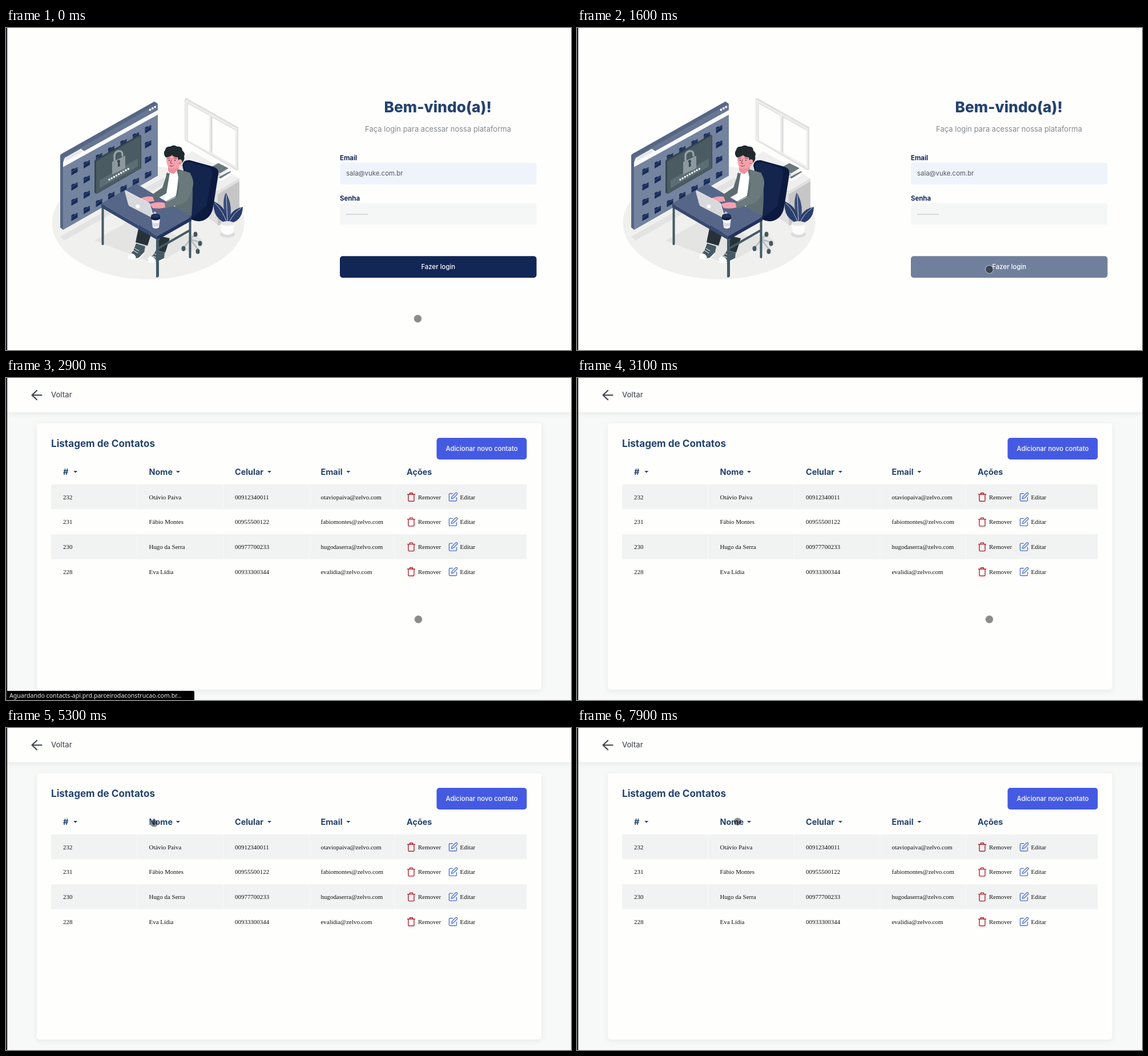
Recreate the animation shown at these times as an HTML page. Size 990 by 565 pixels, loop 8 s.

```html
<!DOCTYPE html>
<html lang="pt-BR">
<head>
<meta charset="utf-8">
<title>Contatos</title>
<style>
  html, body { margin: 0; height: 100%; overflow: hidden; background: #fefefd; }
  svg { display: block; width: 100vw; height: 100vh; }
  text { font: 500 11.4px Inter, sans-serif; }
  .mid { text-anchor: middle; }
  .label { font-weight: 700; fill: #11265a; }
  .title, .head text { font-weight: 700; fill: #24436f; }
  .head text { font-size: 14.4px; }
  #rows text { font: 10.95px "Liberation Serif", serif; fill: #111; }
  .line { fill: none; stroke-linecap: round; stroke-linejoin: round; }
</style>
</head>
<body>
<svg viewBox="0 0 990 565">
<defs>
  <filter id="soft" x="-5%" y="-10%" width="110%" height="125%">
    <feDropShadow dx="0" dy="2" stdDeviation="5" flood-opacity=".07"/>
  </filter>
  <g id="folder">
    <path d="M-5.500-2.500l4-2.500 1.200 1.200 5.800-3.300v8.500l-11 6.300z"/>
    <path d="M-5.500 3.500l1.500-3 10-5.700" fill="none" stroke="#53648a" stroke-width=".7"/>
  </g>
  <g id="trash" class="line" stroke="#b4202f" stroke-width="1.400">
    <path d="M-6.500-4.500h13M-5-4.500v10.500q0 1.500 1.500 1.500h7q1.500 0 1.500-1.500v-10.500M-2.500-4.500v-2.500h5v2.500"/>
  </g>
  <g id="edit" class="line" stroke="#4f74d4" stroke-width="1.400">
    <path d="M-1-6h-4.500q-1.500 0-1.500 1.500v10q0 1.500 1.500 1.500h10q1.500 0 1.500-1.500v-4.500M-3 3l.8-3.400 6.700-6.700q1.200-.8 2.300.3t.2 2.300l-6.700 6.700z"/>
  </g>
</defs>

<g id="login">
  <rect width="990" height="565" fill="#fefefd"/>
  <ellipse cx="249" cy="342" rx="168.500" ry="99" fill="#f0f0ef"/>

  <!-- window -->
  <path d="M313 124l3-1 91 51v75l-3 1-91-53z" fill="#dedede"/>
  <path d="M314 125l91 51v72l-91-52z" fill="#ededed"/>
  <path d="M318 132l38 21v64l-38-21zM361 156l41 23v63l-41-23z" fill="#fefefd"/>
  <path class="line" d="M318 196v-64l38 21M361 219v-63l41 23M359.500 155v62" stroke="#d2d2d2"/>

  <!-- cabinet, books, plant -->
  <path d="M302 234l24-18 83 48-38 23z" fill="#efefef"/>
  <path d="M302 234l69 53v58l-69-48z" fill="#dedede"/>
  <path d="M371 287l38-23v66l-38 17z" fill="#c6c6c6"/>
  <path d="M371 287l38-23v5l-38 23z" fill="#dfdfdf"/>
  <path d="M362 254l14 8 17-9v6l-17 10-14-8z" fill="#fff"/>
  <path d="M356 246l16-9 18 9-15 9zM372 262l21-11 1 2-18 11z" fill="#6a787e"/>
  <path d="M356 247l19 9v4l-19-9z" fill="#b9bfc1"/>
  <ellipse cx="388" cy="362" rx="13" ry="6" fill="#dcdcdc"/>
  <path d="M388 343q-12-34-3-54 14 22 6 54z" fill="#3a4d78"/>
  <path d="M387 343q-26-9-23-39 24 11 25 39zM390 343q0-24 25-29-1 26-25 29z" fill="#2a3d6c"/>
  <path class="line" d="M388 342l-2-48M387 342q-6-20-21-35M391 341q6-15 21-25" stroke="#c4ccdc" stroke-width="1"/>
  <path d="M376 343h24l-2 16q-10 8-20 0z" fill="#fcfcfc"/>
  <ellipse cx="388" cy="343" rx="12" ry="4" fill="#e8e8e8"/>

  <!-- screen with folders -->
  <path d="M95 366l180-103 12 5-185 105z" fill="#e3e3e3"/>
  <path d="M95 224q0-2 2-3l163-92 6 4v126l-166 95-5-4z" fill="#566684"/>
  <path d="M100 228l166-95v126l-166 95z" fill="#74839e"/>
  <path d="M100 228l166-95v14l-166 95z" fill="#677793"/>
  <path d="M100 236l3-8 28-16 6 4 129-72v8l-166 92z" fill="#fbfbfb"/>
  <path d="M105 228l25-14 4 3-30 17z" fill="#e3e6ec"/>
  <path class="line" d="M252.500 143.500l10-5.700" stroke="#fff" stroke-width="3.800" stroke-dasharray="0 5"/>
  <g id="folders" fill="#182c58"></g>
  <path d="M155 233l3-3 76-43 3 2v57l-78 45-4-2z" fill="#37474f"/>
  <path d="M158 234l78-45v57l-78 45z" fill="#4a5b62"/>
  <path d="M164 267l67-38v14l-67 38z" fill="#5d6d74"/>
  <path class="line" d="M190 232v-8q1-7 7-8 7-1 7 6v2" stroke="#98a3a8" stroke-width="3.400"/>
  <path d="M186 235l23-11v22l-23 11z" fill="#8d999e"/>
  <path d="M196 236a2.500 2.500 0 1 1 3 0l1 6-4 2z" fill="#35454c"/>
  <path class="line" d="M181 266l33.500-19" stroke="#fff" stroke-width="3.500" stroke-dasharray="0 4.780"/>

  <!-- chair -->
  <path d="M155 373l78-44 92 50-62 35z" fill="#e4e4e3"/>
  <ellipse cx="322" cy="377" rx="23" ry="14" fill="#e4e4e3"/>
  <path class="line" d="M323 338v33l-11 14M323 371l13 17M323 371l17 5M323 371l10-11" stroke="#b5bdc0" stroke-width="2.500"/>
  <g fill="#455860"><ellipse cx="311" cy="387" rx="3.500" ry="4.500"/><ellipse cx="336" cy="392" rx="3.500" ry="4.500"/><ellipse cx="340" cy="378" rx="3.500" ry="4.500"/><ellipse cx="332" cy="362" rx="3.500" ry="4.500"/></g>
  <path d="M309 241q1-10 13-9l40 11q12 3 10 14l-9 57q-3 18-18 24-10 3-20-2l-20-14 19-15z" fill="#0c1a3f"/>
  <path d="M311 239q4-5 14-3l30 9q8 3 6 13l-10 55-27 21-19-15 20-20z" fill="#13244d"/>

  <!-- person -->
  <path d="M234 342l22 14-8 26-21-6zM270 365l17 4-8 25-16-4z" fill="#263238"/>
  <path d="M228 378l16 5-2 11-9 10q-15 4-20-2l10-11zM263 390l15 4-1 10-10 7q-15 3-20-4l11-9z" fill="#455a64"/>
  <path d="M213 401l6-6q7 1 9 8l-3 2q-8 1-12-4zM247 406l6-6q8 1 10 9l-4 2q-8 1-12-5z" fill="#fff"/>
  <path class="line" d="M214 403q8 4 19 1l9-9M248 409q9 4 19 1l10-5" stroke="#fff" stroke-width="2"/>
  <path class="line" d="M223 390l8 5M226 387l7 4M257 400l8 4M260 396l7 4" stroke="#fff"/>
  <path d="M281 255l14-9 28 8q7 20 2 76l-48-16z" fill="#5f6e72"/>
  <path d="M284 252l15-4 3 14-6 53-20-7z" fill="#fff"/>
  <path d="M284 240h18l1 7-9 9q-8-1-10-6z" fill="#f08f9c"/>
  <path d="M281 223q12-5 25 0l2 10q0 7-8 12-9 4-15 0-5-8-4-22z" fill="#f7a1ad"/>
  <path d="M280 227q-6-7-1-13 1-7 9-6 6-4 12 0 9-1 9 7 6 5 3 10 2 6-4 12l-5 1-2-11q-7 0-10-4-5 4-11 4z" fill="#20292e"/>
  <circle cx="305" cy="234" r="3.500" fill="#f7a1ad"/>
  <path class="line" d="M283 229l4-1M294 228l5 1M290 231l-2 6 3 1M287 242q4 2 7-1" stroke="#743b48"/>
  <circle cx="286" cy="232" r="1" fill="#263238"/><circle cx="296" cy="232" r="1" fill="#263238"/>

  <!-- desk -->
  <path class="line" d="M169.500 314v65M322.500 334v68M268 386l54-31" stroke="#455a64" stroke-width="4"/>
  <path d="M167 308l61-35 97 58-60 34z" fill="#566689"/>
  <path d="M167 308l98 57v7l-98-57z" fill="#384970"/>
  <path d="M265 365l60-34v7l-60 34z" fill="#22335d"/>
  <path d="M263 371l5-2v67l-3 2-2-1z" fill="#455a64"/>

  <!-- arms, laptop, cup -->
  <path d="M282 256l-8 24-22 15 5 9 24-14 6-36z" fill="#5c6b6f"/>
  <path d="M303 250q23 0 25 19 1 15-9 31-6 8-17 10l-24 7-2-9 21-11 4-18z" fill="#6a797c"/>
  <path class="line" d="M304 272l-4 22-22 12" stroke="#4c5c60"/>
  <path d="M257 296q-12-2-24 4l6 6 21-2zM278 307q-12-4-26 2l5 7q13 2 22-1z" fill="#f7a1ad"/>
  <path d="M253 331l7-9 3 1 1 7-5 5z" fill="#c1c4c7"/>
  <path d="M208 287q0-2 3-1l39 21q2 1 3 4l7 24-43-22q-2-1-3-4z" fill="#d8d9dc"/>
  <path class="line" d="M209 285l42 22 8 27" stroke="#f3f3f4"/>
  <circle cx="231" cy="313" r="3.500" fill="#fff"/>
  <path d="M255 332h15l-2 18q-6 4-11 0z" fill="#f7f7fa"/>
  <path d="M254 331q0-5 8-5t8 5v4q-8 5-16 0z" fill="#0f1e45"/>
  <ellipse cx="262" cy="330" rx="7" ry="3" fill="#21345f"/>
  <path d="M256 341q6 3 13 0l-1 6q-6 3-11 0z" fill="#d7dae5"/>

  <!-- form -->
  <text class="title mid" x="756.800" y="148" style="font-size:26.300px;font-weight:800">Bem-vindo(a)!</text>
  <text class="mid" x="757" y="182.200" style="font-size:13px;font-weight:400" fill="#85888d">Faça login para acessar nossa plataforma</text>
  <text class="label" x="585" y="232">Email</text>
  <rect x="585" y="236.500" width="344.600" height="38" rx="4.500" fill="#eff4fc"/>
  <text x="596" y="259" fill="#53575e" style="font-weight:400">sala@vuke.com.br</text>
  <text class="label" x="585" y="303">Senha</text>
  <rect x="585" y="307.300" width="344.600" height="38" rx="4.500" fill="#f5f7f7"/>
  <path class="line" d="M597.500 327h35.500" stroke="#7d8186" stroke-width="1.600" stroke-dasharray="0 3.500"/>
  <rect id="submit" x="585" y="400.200" width="344.600" height="38" rx="5"/>
  <text class="mid" x="757.300" y="423.200" fill="#fff">Fazer login</text>
</g>

<g id="list">
  <rect width="990" height="565" fill="#f7f9f9"/>
  <rect width="990" height="60" fill="#fefefd" filter="url(#soft)"/>
  <path id="back" class="line" d="M62.500 30h-16M54 22l-8.500 8 8.500 8" stroke="#40454b" stroke-width="2.200"/>
  <text x="79" y="34" fill="#50545a" style="font-size:13px">Voltar</text>
  <rect x="54" y="79.500" width="884" height="467" rx="5" fill="#fefefd" filter="url(#soft)"/>
  <text class="title" x="79" y="120.500" style="font-size:17.100px">Listagem de Contatos</text>
  <rect x="754.500" y="105" width="158" height="38" rx="5" fill="#455ae2"/>
  <text class="mid" x="833.500" y="128" fill="#fff">Adicionar novo contato</text>
  <g id="empty" class="head mid"></g>
  <g id="table">
    <g id="head" class="head"></g>
    <g id="carets" fill="#24436f"></g>
    <g id="rows"></g>
  </g>
  <g id="status">
    <path d="M2 549h326q2 0 2 2v14h-328z"/>
    <text x="6" y="561" fill="#eee" style="font:10.600px 'Noto Sans',sans-serif">Aguardando contacts-api.prd.parceirodaconstrucao.com.br…</text>
  </g>
</g>

<rect width="2.200" height="565" fill="#232226"/>
<circle id="pointer" r="7" fill-opacity=".45" stroke="#fff" stroke-opacity=".5" stroke-width="1.200"/>
</svg>

<script>
const $ = id => document.getElementById(id);
const show = (id, on) => $(id).style.display = on ? '' : 'none';

const columns = ['#', 'Nome', 'Celular', 'Email', 'Ações'];
const left = [100, 250.5, 401, 551.5, 702];
const centers = [106, 245, 429, 620, 797];
const caretX = [121.7, 301.5, 461.5, 599.8];
const contacts = [
  [232, 'Otávio Paiva', '00912340011', 'otaviopaiva@zelvo.com'],
  [231, 'Fábio Montes', '00955500122', 'fabiomontes@zelvo.com'],
  [230, 'Hugo da Serra', '00977700233', 'hugodaserra@zelvo.com'],
  [228, 'Eva Lídia', '00933300344', 'evalidia@zelvo.com']
];
const byName = [...contacts].sort((a, b) => a[1].localeCompare(b[1]));

const text = (x, y, s) => `<text x="${x}" y="${y}">${s}</text>`;
const heads = xs => columns.map((s, i) => text(xs[i], 170, s)).join('');
$('empty').innerHTML = heads(centers);
$('head').innerHTML = heads(left);

let folders = '';
for (let c = 0; c < 7; c++)
  for (let r = 0; r < 4; r++)
    folders += `<use href="#folder" x="${120 + c * 21.5}" y="${251 - c * 12.3 + r * 26.7}"/>`;
$('folders').innerHTML = folders;

function row(contact, i) {
  const y = 208.7 + i * 43.7, top = y - 21.8, base = y + 3.8;
  const gaps = left.slice(1).map(x => `M${x - 20.5} ${top}v43.5`).join('');
  const band = i % 2 ? '' : `<rect x="79" y="${top}" width="833.5" height="43.5" fill="#f1f2f2"/>` +
    `<path d="${gaps}" stroke="#f7f8f8"/>`;
  return band + contact.map((s, c) => text(left[c], base, s)).join('') +
    `<g class="icons"><use href="#trash" x="710" y="${y}"/><use href="#edit" x="783.5" y="${y}"/></g>` +
    text(722, base, 'Remover') + text(795.5, base, 'Editar');
}

let shownOrder;
function fillTable(sorted) {
  if (sorted === shownOrder) return;
  shownOrder = sorted;
  $('rows').innerHTML = (sorted ? byName : contacts).map(row).join('');
  $('carets').innerHTML = caretX.map((x, i) => sorted && i === 1
    ? `<path d="M${x - 3.5} 166.300h7l-3.500-3.500z"/>`
    : `<path d="M${x - 3.5} 163h7l-3.500 3.500z"/>`).join('');
}

// pointer stops: time, x, y
const path = [
  [400, 721.5, 510], [700, 730.5, 465], [1000, 722.5, 423.5],
  [3900, 722.5, 423.5], [4400, 664, 411], [4800, 540, 383],
  [5000, 214, 203], [5100, 225, 190], [5200, 225, 190], [5300, 259.5, 167],
  [5500, 277, 161], [5600, 277, 161], [5700, 281, 163], [6400, 281, 163], [6500, 281.5, 164.3]
];
function pointerAt(t) {
  const n = path.findIndex(p => p[0] > t);
  if (n === 0) return path[0].slice(1);
  if (n < 0) return path[path.length - 1].slice(1);
  const [a, b] = [path[n - 1], path[n]], k = (t - a[0]) / (b[0] - a[0]);
  return [1, 2].map(i => a[i] + (b[i] - a[i]) * k);
}

function draw(t) {
  t = Math.floor(t / 100) * 100;
  show('login', t < 2500);
  show('list', t >= 2500);
  $('submit').setAttribute('fill', t < 1500 ? '#122755' : t < 1600 ? '#56678a' : '#70809c');
  show('back', t >= 2600);
  show('empty', t < 2800);
  show('table', t >= 2800);
  show('carets', t >= 2900);
  show('status', t < 3100);
  fillTable(t >= 6000 && t < 7800);
  document.querySelectorAll('.icons').forEach(g => g.style.display = t >= 2900 ? '' : 'none');
  $('pointer').setAttribute('transform', `translate(${pointerAt(t)})`);
}

const start = performance.now();
function frame() {
  draw((performance.now() - start) % 8000);
  requestAnimationFrame(frame);
}
frame();
</script>
</body>
</html>
```
